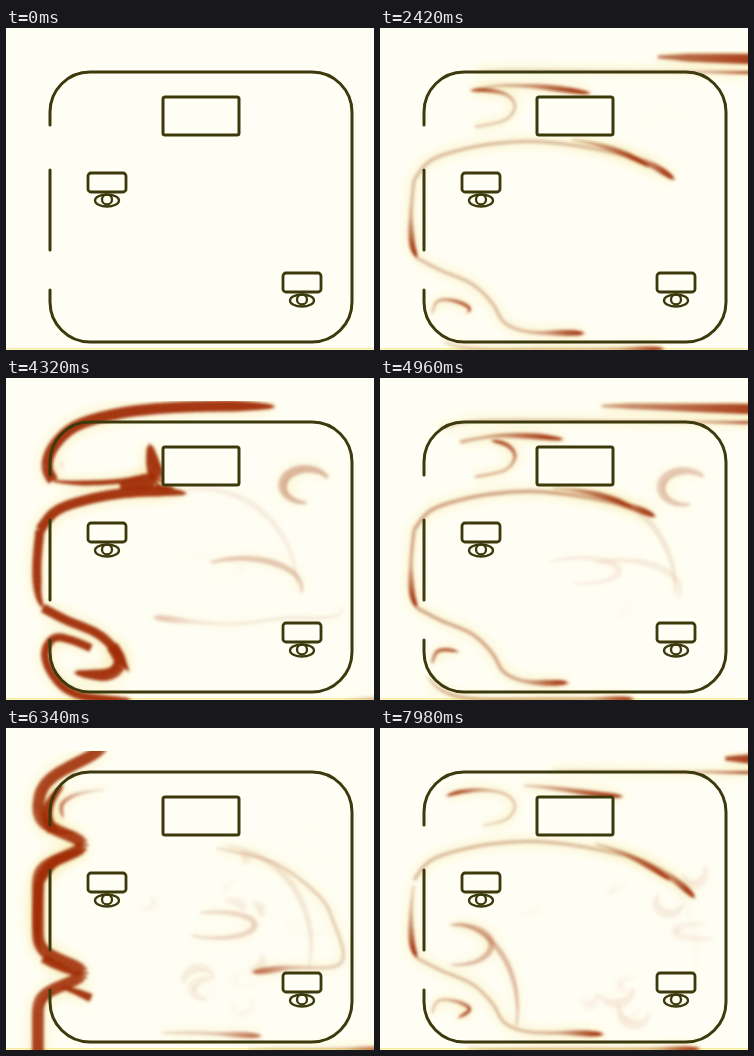
Recreate the animation shown at these times as an HTML page with a canvas. Size 368x322 px, loop 8 s.

```html
<!DOCTYPE html>
<html lang="en">
<head>
<meta charset="utf-8">
<title>Smoke pulses around a room</title>
<style>
html, body { margin: 0; width: 100%; height: 100%; overflow: hidden; background: #fffef4; }
canvas { display: block; }
</style>
</head>
<body>
<canvas id="stage" width="368" height="322"></canvas>
<script>
const W = 368, H = 322, PAD = 40, LOOP = 8000, PERIOD = 2690;
const PAPER = '#fffef4', INK = '#3c390d';
const RUST = [160, 46, 8], TAN = [192, 138, 108];
const ctx = document.getElementById('stage').getContext('2d');

function makeLayer() {
  const c = document.createElement('canvas');
  c.width = W + 2 * PAD;
  c.height = H + 2 * PAD;
  const g = c.getContext('2d');
  g.translate(PAD, PAD);
  return g;
}
const smoke = makeLayer(), haze = makeLayer();

const clamp = v => Math.max(0, Math.min(1, v));
const ramp = (a, b, v) => clamp((v - a) / (b - a));
const smooth = (a, b, v) => { const u = ramp(a, b, v); return u * u * (3 - 2 * u); };
const mix = (a, b, u) => a + (b - a) * u;
const bell = v => Math.exp(-v * v);

const spline = (a, b, c, d, u) =>
  b + 0.5 * u * (c - a + u * (2 * a - 5 * b + 4 * c - d + u * (3 * (b - c) + d - a)));

// Smooth path through "x,y x,y ...", addressed by distance.
function makePath(text) {
  const p = text.split(' ').map(s => s.split(',').map(Number));
  const at = i => p[Math.max(0, Math.min(p.length - 1, i))];
  const pts = [], dist = [];
  for (let s = 0; s <= p.length - 1; s += 0.05) {
    const i = Math.floor(s);
    const q = [0, 1].map(k => spline(at(i - 1)[k], at(i)[k], at(i + 1)[k], at(i + 2)[k], s - i));
    const last = pts[pts.length - 1] || q;
    dist.push((dist[dist.length - 1] || 0) + Math.hypot(q[0] - last[0], q[1] - last[1]));
    pts.push(q);
  }
  const length = dist[dist.length - 1];
  const point = d => {
    const i = Math.max(1, dist.findIndex(v => v >= d));
    const u = clamp((d - dist[i - 1]) / (dist[i] - dist[i - 1] || 1));
    return [0, 1].map(k => mix(pts[i - 1][k], pts[i][k], u));
  };
  return { length, point };
}

// Dye flows along a path: the head advances during `grow`, the tail follows during `drain`.
// `plume` is the length of the part near the head that stays dense.
const channels = [];
function channel(text, width, grow, drain, plume = 28) {
  channels.push({ ...makePath(text), width, grow, drain, plume });
}

// Over the roof, and its thin wake
channel('47,103 41,88 48,68 70,48 110,36 160,30 230,28 320,30 420,32', 11, [800, 2100], [1680, 2800], 150);
channel('60,50 110,42 250,43 400,45', 4, [1700, 2200], [2330, 3150], 60);
// Upper opening: inner lip, splash on the cabinet, corner eddy, stream over the cabinet
channel('46,103 75,105 115,103 142,96', 5, [800, 1450], [1620, 2100]);
channel('112,109 138,105 150,101 147,86 143,64', 16, [1050, 1650], [1620, 2050]);
channel('95,99 125,92 135,78 125,66 100,62 72,66 56,76 57,90', 6, [1700, 2800], [2500, 4400]);
channel('80,64 115,58 150,58 180,61 215,66 250,70 272,80 281,100', 8, [1700, 2900], [2350, 3200], 50);
// Main jet round the room, and the branch above it
channel('34,152 50,133 80,122 120,115 165,114 220,122 270,136 310,165 326,190 335,235 280,240 220,246 145,239',
  10, [600, 4300], [2950, 5050]);
channel('150,109 200,113 245,126 290,152 325,185', 8, [1500, 2950], [2100, 3600], 45);
// Outer wall
channel('34,152 31,185 32,215 37,230', 9, [700, 1000], [2500, 4000]);
// Lower opening: jet to the floor, hook, lip and street, corner eddy
channel('37,230 60,242 92,256 112,275 125,295 150,304 195,305 255,308', 9, [600, 2900], [2700, 4300]);
channel('106,268 114,284 104,296 80,296 56,292', 12, [1250, 1700], [1640, 2200]);
channel('85,270 65,262 48,260 39,275 46,296 65,314 100,321 180,321 380,321', 8, [800, 2900], [1700, 4600]);
channel('52,285 58,273 75,273 90,281 78,290', 5, [2000, 2500], [2700, 3600]);

// Slow arcs that linger: ellipse, start and sweep in turns, time of peak, life, strength.
const swirls = [];
function swirl(cx, cy, rx, ry, from, sweep, peak, life, strength, width = 6) {
  swirls.push({ cx, cy, rx, ry, from, sweep, peak, life, strength, width });
}
swirl(301, 108, 24, 17, -0.08, -0.67, 4400, 1000, 0.6, 9);
swirl(235, 210, 60, 30, -0.34, 0.36, 4200, 700, 0.45);
swirl(207, 196, 40, 13, -0.33, 0.66, 6000, 1000, 0.35);
swirl(205, 215, 95, 100, -0.25, 0.27, 5600, 1700, 0.22);
swirl(78, 217, 34, 20, -0.28, 0.56, 8050, 320, 0.6);
swirl(72, 282, 66, 86, -0.24, 0.27, 8050, 320, 0.6, 5);

let seed = 11;
const random = () => (seed = seed * 16807 % 2147483647) / 2147483647;
for (let i = 0; i < 16; i++) {
  swirl(mix(140, 325, random()), mix(85, 290, random()), mix(8, 30, random()), mix(6, 16, random()),
    random(), mix(0.3, 0.6, random()), mix(5800, 8200, random()), 800, 0.13, 9);
}

// Draw a strand of [x, y, width, density] samples, `alpha` over all.
function strand(pts, alpha) {
  for (let i = 1; i < pts.length; i++) {
    const [x0, y0] = pts[i - 1], [x, y, width, density] = pts[i];
    const line = (g, style, w, a) => {
      g.strokeStyle = style;
      g.lineWidth = w;
      g.globalAlpha = a;
      g.beginPath();
      g.moveTo(x0, y0);
      g.lineTo(x + (x - x0) * 0.15, y + (y - y0) * 0.15);
      g.stroke();
    };
    const color = `rgb(${RUST.map((v, k) => mix(TAN[k], v, Math.sqrt(density)))})`;
    line(smoke, color, width, alpha * mix(0.55, 0.96, density));
    line(haze, '#f0dc70', width * 1.4 + 7, alpha * 0.2);
  }
}

function drawChannel(c, age) {
  const head = ramp(...c.grow, age) * c.length, tail = ramp(...c.drain, age) * c.length;
  if (head - tail < 2) return;
  const fresh = 1 - smooth(1640, 2400, age);
  const steps = Math.ceil((head - tail) / 2.5), pts = [];
  for (let i = 0; i <= steps; i++) {
    const d = mix(tail, head, i / steps);
    const density = Math.max(fresh, bell((head - d) / c.plume));
    const tip = mix(0.15, 1, Math.sqrt(clamp((head - d) / Math.min(c.plume, 40))));
    const width = c.width * mix(0.32, 1, density) * tip * mix(0.4, 1, clamp(age > c.drain[0] ? (d - tail) / 30 : 1));
    pts.push([...c.point(d), width, density]);
  }
  strand(pts, 1 - smooth(2700, 5100, age));
}

// The sheet of smoke blown in from the left, bending at the openings and the roof.
function drawSheet(age) {
  const alpha = smooth(150, 350, age) * (1 - smooth(900, 1250, age));
  if (!alpha) return;
  const p = ramp(200, 1000, age), push = smooth(500, 1050, age), pts = [];
  for (let y = 18; y < H + 8; y += 2) {
    const jets = bell((y - 117) / 16) + bell((y - 245) / 16);
    const x = mix(-10, 32, p * (2 - p)) + push * (48 * jets + 70 * bell((y - 15) / 28));
    pts.push([x, y, mix(5, 12, p), 1]);
  }
  strand(pts, alpha);
}

function drawSwirl(s, t) {
  const alpha = s.strength * bell((t - s.peak) / s.life);
  if (alpha < 0.01) return;
  const drift = (t - s.peak) / 1000, pts = [];
  for (let i = 0; i <= 30; i++) {
    const u = i / 30, a = 2 * Math.PI * (s.from + s.sweep * (u + drift * 0.08));
    const x = s.cx + drift * 7 + s.rx * Math.cos(a), y = s.cy + drift * 3 + s.ry * Math.sin(a);
    pts.push([x, y, s.width * mix(0.3, 1, Math.sin(u * Math.PI)), 0.25]);
  }
  strand(pts, alpha);
}

function blit(layer, blur) {
  ctx.filter = `blur(${blur}px)`;
  ctx.drawImage(layer.canvas, -PAD, -PAD);
  ctx.filter = 'none';
}

function drawSmoke(t) {
  for (const g of [smoke, haze]) g.clearRect(-PAD, -PAD, W + 2 * PAD, H + 2 * PAD);
  for (const s of swirls) drawSwirl(s, t);
  for (let start = 0; start < t; start += PERIOD) {
    drawSheet(t - start);
    for (const c of channels) drawChannel(c, t - start);
  }
  ctx.save();
  ctx.beginPath();
  ctx.rect(0, 23, W, H);
  ctx.clip();
  blit(haze, 5);
  blit(smoke, 1.8);
  ctx.restore();
}

function box(x, y, w, h, r) {
  ctx.beginPath();
  ctx.roundRect(x, y, w, h, r);
  ctx.fillStyle = PAPER;
  ctx.fill();
  ctx.stroke();
}

function desk(x, y) {
  ctx.lineWidth = 2.3;
  ctx.beginPath();
  ctx.ellipse(x + 19, y + 27.5, 12, 6, 0, 0, 7);
  ctx.fillStyle = PAPER;
  ctx.fill();
  ctx.stroke();
  ctx.beginPath();
  ctx.arc(x + 19, y + 26.5, 5, 0, 7);
  ctx.stroke();
  ctx.lineWidth = 2.8;
  box(x, y, 38, 19, 3);
}

function drawRoom() {
  ctx.strokeStyle = INK;
  ctx.lineWidth = 3;
  ctx.lineCap = 'round';
  ctx.beginPath();
  ctx.moveTo(44, 97);
  ctx.lineTo(44, 84);
  ctx.arcTo(44, 44, 84, 44, 40);
  ctx.arcTo(346, 44, 346, 84, 40);
  ctx.arcTo(346, 314, 306, 314, 40);
  ctx.arcTo(44, 314, 44, 274, 40);
  ctx.lineTo(44, 262);
  ctx.moveTo(44, 142);
  ctx.lineTo(44, 222);
  ctx.stroke();
  box(157, 69, 76, 38, 2);
  desk(82, 145);
  desk(277, 245);
}

function draw(t) {
  ctx.fillStyle = PAPER;
  ctx.fillRect(0, 0, W, H);
  ctx.fillStyle = '#f6ee9c';
  ctx.fillRect(0, 320, W, 1.5);
  drawSmoke(t);
  drawRoom();
}

const begin = performance.now();
function tick() {
  draw((performance.now() - begin) % LOOP);
  requestAnimationFrame(tick);
}
tick();
</script>
</body>
</html>
```
